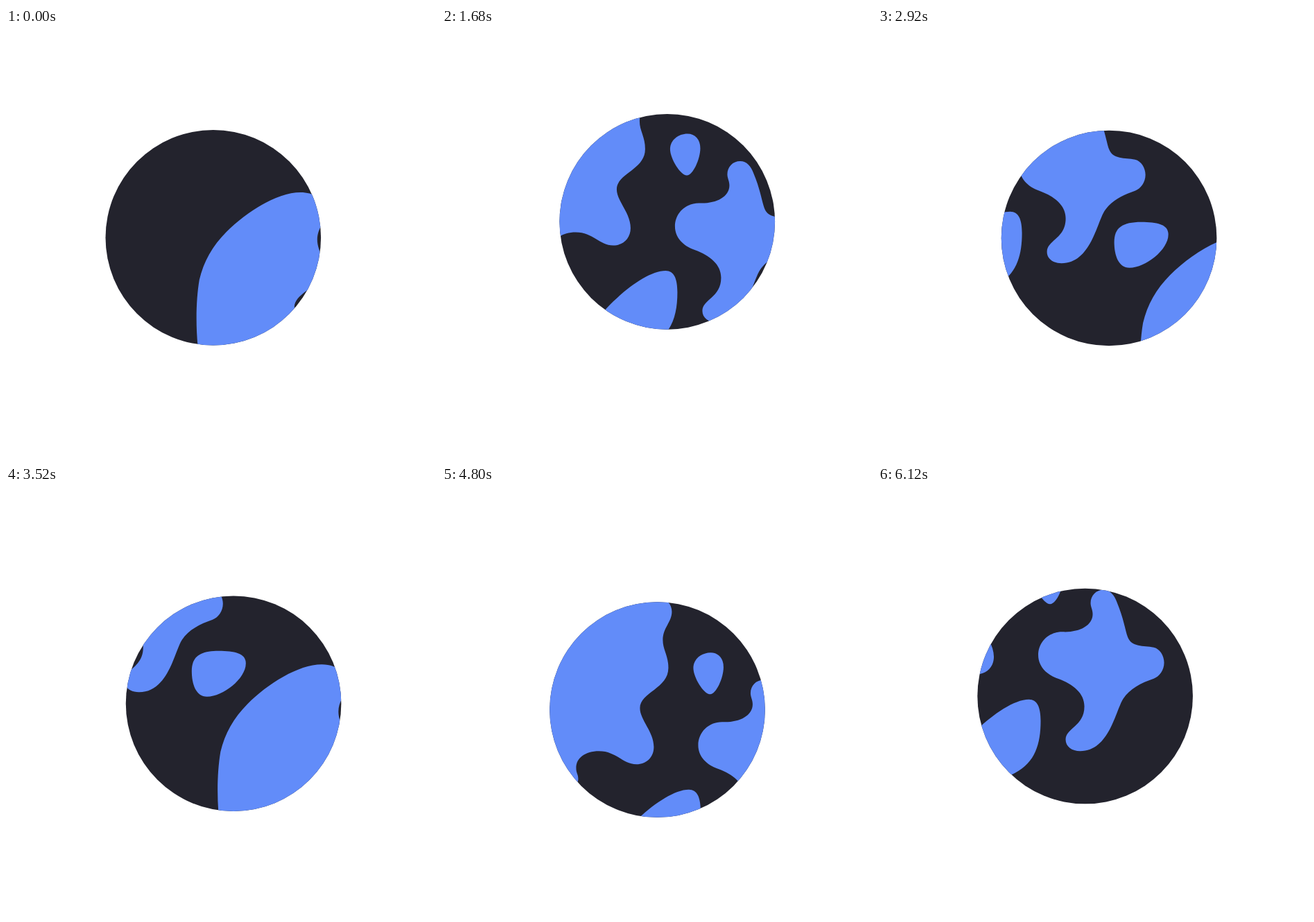
An HTML page for the animation above (6.16 s loop, 620 px wide and 620 px high).

```html
<!DOCTYPE html>
<html lang="en">
<head>
<meta charset="utf-8">
<title>Turning globe</title>
<style>
  html, body { margin: 0; width: 100%; height: 100%; overflow: hidden; background: #fff; }
  svg { display: block; width: 100vw; height: 100vh; }
</style>
</head>
<body>
<svg viewBox="0 0 620 620">
  <defs>
    <clipPath id="disc"><circle r="155.3"/></clipPath>
    <g id="lands">
      <g transform="translate(-315 -296)">
        <path d="M324 130C346 130 361 143 361 157C361 172 348 180 348 198C348 212 356 220 356 238
          C356 268 315 273 315 296C315 313 335 330 335 352C335 367 324 377 310 377
          C290 377 281 358 256 358C236 358 223 368 223 382C223 390 226 391 226 398
          C226 409 213 418 200 418C186 418 180 385 176.5 358C172.5 325 173 285 178 256
          C184 230 197 207 217 187C246 158 290 130 324 130Z"/>
        <path d="M417 216C428 216 435.5 224 435.5 237C435.5 252 425 276 416 276
          C407 276 392 252 392 238C392 225 404 216 417 216Z"/>
      </g>
      <g transform="translate(-187.5 -187.5)">
        <path d="M365.5 147C375 147 381 154 385 165C395 189 397 206 400.5 215C406 230 423 227 438 230
          C447 232 453 242 453 252C453 263 446 272 438 275C420 281 403 290 394 304
          C383 321 374 379.5 332 379.5C320 379.5 311 373 311 363C311 346 338 344 338 315
          C338 296 322 283 300 275C283 269 271.5 257 271.5 241C271.5 222 287 207 307 207.5
          C330 208.5 350 199 350 182C350 175 347 172 347 166C347 155 355 147 365.5 147Z"/>
        <path d="M258 305C270 305 275 316 275 336C275 369 267 396 238 411
          C215 424 150 420 150 395C150 375 220 305 258 305Z"/>
      </g>
    </g>
  </defs>
  <g id="globe">
    <circle r="155.3" fill="#23232d"/>
    <g clip-path="url(#disc)">
      <g id="map" fill="#628cf9">
        <use href="#lands"/>
        <path transform="translate(-48.5 -106.5)" d="M308 239C330 239 347 242 347 257
          C347 279 314 305 291 305C275 305 269 287 269 268C269 247 281 239 308 239Z"/>
        <use href="#lands" x="399" y="318"/>
      </g>
    </g>
  </g>
</svg>
<script>
  const LOOP = 6160, STEP = 40;
  const { sin, cos, PI } = Math;

  // The globe drifts once round a slightly uneven oval.
  function globeAt(t) {
    const a = 2 * PI * t / LOOP;
    return [
      316.6 - 17 * cos(a) + 4.6 * sin(a) - 1.2 * cos(2 * a) - 0.8 * sin(2 * a) + 0.4 * (cos(3 * a) + sin(3 * a)),
      302.6 - 1.9 * cos(a) - 21.4 * sin(a) + 1.6 * cos(2 * a) + 0.9 * sin(3 * a)
    ];
  }

  // Inside it the map slides steadily, then slows down near the end.
  function mapAt(t) {
    const s = t / 1000, braking = Math.max(0, s - 4.4) ** 2;
    return [117 - 113 * s + 8.1 * braking, 100.7 - 87.8 * s + 2 * braking];
  }

  const globe = document.getElementById("globe");
  const map = document.getElementById("map");
  const place = (node, point) => node.setAttribute("transform", `translate(${point})`);

  function draw(t) {
    place(globe, globeAt(t));
    place(map, mapAt(t));
  }

  const start = performance.now();
  function tick() {
    const elapsed = (performance.now() - start) % LOOP;
    draw(Math.floor(elapsed / STEP) * STEP);
    requestAnimationFrame(tick);
  }
  tick();
</script>
</body>
</html>
```
